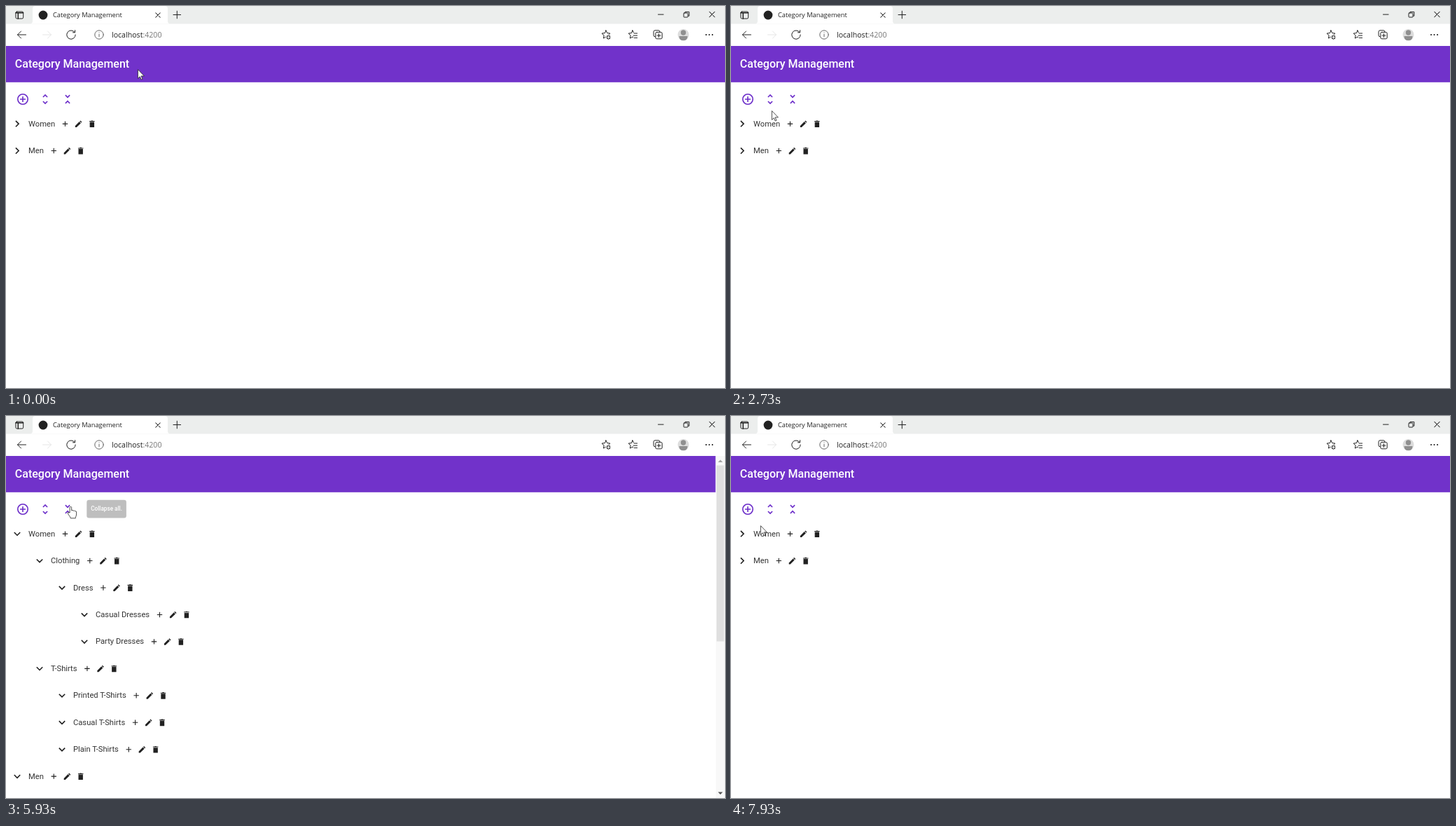
An HTML page that plays this animation: 1027 by 545 pixels, repeating every 8000 ms.

```html
<!DOCTYPE html>
<html lang="en">
<head>
<meta charset="utf-8">
<title>Category Management</title>
<style>
  html, body { margin: 0; width: 100%; height: 100%; overflow: hidden; background: #fff; }
  svg { display: block; width: 100vw; height: 100vh; }
  text { font-family: Roboto, sans-serif; white-space: pre; }
  .ui { font-family: "Open Sans", "Noto Sans", sans-serif; fill: #222; }
  .thin { fill: none; stroke: #222; stroke-linecap: round; stroke-linejoin: round; }
  .bold { fill: none; stroke-width: 1.6; }
</style>
</head>
<body>
<svg id="stage" viewBox="0 0 1027 545">
  <!-- browser window -->
  <rect width="1027" height="25.5" fill="#eceeed"/>
  <path d="M34 25.5q4 0 4-4V4q0-4 4-4h185q4 0 4 4v17.500q0 4 4 4z" fill="#fff"/>
  <circle cx="53" cy="13" r="6.400" fill="#222"/>
  <text class="ui" x="67" y="16.200" font-size="9.300">Category Management</text>
  <text class="ui" x="151" y="44.800" font-size="10.600">localhost<tspan fill="#777">:4200</tspan></text>
  <g id="chrome" class="thin">
    <rect x="13.900" y="8" width="10.800" height="10" rx="1.800"/>
    <path d="M14 9.700h10.600M17.300 10v8" stroke-width="1.500"/>
    <path d="M931.500 12.100h7.600M970 9.600v-1.200h5.800v5.800h-1.200"/>
    <rect x="968" y="10" width="6" height="6" rx=".8"/>
    <path d="M28.500 41h-12m5-5l-5 5 5 5"/>
    <path d="M52.500 41h12m-5-5l5 5-5 5" stroke="#e6e6e6"/>
    <path d="M98 37.400A6.200 6.200 0 1 0 99.200 41M98.600 34.600v3.200h-3.200"/>
    <g stroke="#666"><circle cx="133" cy="41" r="6.200"/><path d="M133 40.200v3.600m0-6v.1"/></g>
    <path d="M927 43.800q-2 0-2-2v-5q0-2 2-2h5q2 0 2 2"/>
    <rect x="927.800" y="37.400" width="9.400" height="9.400" rx="1.800"/>
    <path d="M1000 41h.1m4.400 0h.1m4.400 0h.1" stroke-width="2"/>
  </g>
  <g>
    <circle cx="967.500" cy="41" r="8" fill="#dcdcdc"/>
    <circle cx="967.500" cy="38" r="3.700" fill="#8f8f8f"/>
    <path d="M961.500 43h12q0 6.300-6 6.300t-6-6.300z" fill="#8f8f8f"/>
  </g>

  <!-- page -->
  <rect id="header" y="57" height="51.800" fill="#7132ca"/>
  <text x="12.800" y="88.300" font-size="16" font-weight="500" fill="#fff">Category Management</text>
  <g id="tools" class="bold" stroke="#6b2cc9"></g>
  <g id="closed"></g>
  <g id="open"></g>
  <g id="scrollbar">
    <rect x="1014" y="57" width="13" height="488" fill="#f8f8f8"/>
    <rect x="1015" y="70.500" width="10.600" height="251" fill="#dfdfdf"/>
    <path d="M1017 66l3.400-3.600 3.400 3.600z" fill="#a3a3a3"/>
    <path d="M1017 536.500l3.400 3.600 3.400-3.600z" fill="#505050"/>
  </g>
  <g id="tips"></g>
  <g id="cursor" fill="#fff" stroke="#222" stroke-width=".8" stroke-linejoin="round">
    <path id="arrow" d="M.4.6V13.400L3.300 10.700 5.200 15 7 14.200 5.100 9.900H9.400Z"/>
    <path id="hand" d="M-1.400 9V1.700a1.300 1.300 0 0 1 2.600 0V5.800q1.500-1 2.500.4 1.500-.8 2.400.6 2-.4 2 1V11q0 2-1.200 4.500v1.300H-.3q0-2-2.600-4.500L-4.200 9.800q-.4-2 1.900-1z"/>
  </g>
</svg>
<script>
const LOOP = 8000, TICK = 200 / 3;
const $ = id => document.getElementById(id);
const clamp = v => Math.min(1, Math.max(0, v));

function el(parent, name, attrs, content = '') {
  const node = document.createElementNS('http://www.w3.org/2000/svg', name);
  for (const key in attrs) node.setAttribute(key, attrs[key]);
  node.textContent = content;
  return parent.appendChild(node);
}

const path = (parent, d, attrs) => el(parent, 'path', { d, ...attrs });
const plus = (parent, x, y, r, attrs) =>
  path(parent, `M${x - r} ${y}h${2 * r}M${x} ${y - r}v${2 * r}`, attrs);
const chevron = (parent, x, y, r, turn = 0) =>
  path(parent, `M${-r} ${-r / 2}L0 ${r / 2} ${r} ${-r / 2}`, { transform: `translate(${x} ${y}) rotate(${turn})` });

function star(x, y) {
  const points = Array.from({ length: 10 }, (_, i) => {
    const r = i % 2 ? 3 : 6.2, a = i * Math.PI / 5;
    return [x + r * Math.sin(a), y - r * Math.cos(a)];
  });
  el($('chrome'), 'polygon', { points: points.join(' ') });
}

function drawChrome() {
  const g = $('chrome');
  plus(g, 244.3, 12.5, 5.3);
  plus(g, 932.5, 42.1, 2.5);
  for (const [x, y, r] of [[217, 13, 4.6], [1008.5, 12, 5.3]])
    plus(g, x, y, r, { transform: `rotate(45 ${x} ${y})` });
  star(857, 41);
  el(g, 'circle', { cx: 860.6, cy: 44.6, r: 3.6, fill: '#555', stroke: '#fff' });
  plus(g, 860.6, 44.6, 1.6, { stroke: '#fff' });
  star(895, 41);
  el(g, 'rect', { x: 896, y: 38, width: 7, height: 10, fill: '#fff', stroke: 'none' });
  path(g, 'M897 39h4.600m-5.500 3.200h5.500m-4.500 3.200h4.500');
}

function drawTools() {
  const g = $('tools'), y = 133;
  el(g, 'circle', { cx: 24, cy: y, r: 7.2 });
  plus(g, 24, y, 4);
  for (const side of [-1, 1]) {
    chevron(g, 56, y + 4.5 * side, 3.1, side < 0 ? 180 : 0);
    chevron(g, 88, y + 4.3 * side, 3.1, side < 0 ? 0 : 180);
  }
}

// 24-unit outlines
const PENCIL = 'M3 21v-3.750L14 6l4 4L6.800 21zM15 5l2-2 4 4-2 2z';
const TRASH = 'M6 7h12v14H6zM5 4h4l1-1h4l1 1h4v2H5z';

function drawTree(parent, rows, turn) {
  rows.forEach(([level, label], i) => {
    const x = 32 * level, y = 168.1 + 38.45 * i;
    const lines = el(parent, 'g', { class: 'bold', stroke: '#212121' });
    chevron(lines, x + 16, y, 4.2, turn);
    const text = el(parent, 'text', { x: x + 32, y: y + 3.5, 'font-size': 11.2, fill: '#333' }, label);
    const start = x + 46.4 + text.getComputedTextLength();
    plus(lines, start, y, 3.7, { 'stroke-width': 1.1 });
    [PENCIL, TRASH].forEach((d, n) => path(parent, d, {
      fill: '#212121',
      transform: `translate(${start + 19.2 * (n + 1)} ${y + .1}) scale(.533) translate(-12 -12)`
    }));
  });
}

function tooltip(x, width, label) {
  const tip = el($('tips'), 'g', {});
  el(tip, 'rect', { x, y: 119.7, width, height: 25.8, rx: 3.2, fill: '#7f7f7f' });
  el(tip, 'text', {
    x: x + width / 2, y: 135.4, 'text-anchor': 'middle', 'font-size': 8.2, 'font-weight': 500, fill: '#fff'
  }, label);
  return tip;
}

drawChrome();
drawTools();
drawTree($('closed'), [[0, 'Women'], [0, 'Men']], -90);
drawTree($('open'), [
  [0, 'Women'], [1, 'Clothing'], [2, 'Dress'], [3, 'Casual Dresses'], [3, 'Party Dresses'],
  [1, 'T-Shirts'], [2, 'Printed T-Shirts'], [2, 'Casual T-Shirts'], [2, 'Plain T-Shirts'], [0, 'Men']
], 0);
const expandTip = tooltip(83.2, 51.8, 'Expand all.');
const collapseTip = tooltip(115.3, 56.6, 'Collapse all.');

// pointer moves: start and end tick, destination, sideways bow
const MOVES = [
  { from: 0, to: 1, x: 193, y: 189 },
  { from: 10, to: 16, x: 0, y: 336 },
  { from: 20, to: 21, x: 490, y: 264 },
  { from: 24, to: 31, x: 301, y: 148, bow: 90 },
  { from: 35, to: 41, x: 58, y: 149 },
  { from: 41, to: 48, x: 60, y: 128, bow: -17 },
  { from: 48, to: 55, x: 62.5, y: 133 },
  { from: 86, to: 89, x: 92.5, y: 129 },
  { from: 89, to: 93, x: 98.5, y: 131 },
  { from: 112, to: 119, x: 42, y: 156, bow: 44 }
];

function pointer(tick) {
  let x = 188, y = 90;
  for (const move of MOVES) {
    const k = clamp((tick - move.from) / (move.to - move.from));
    x += (move.x - x) * k + (move.bow || 0) * Math.sin(Math.PI * k);
    y += (move.y - y) * k;
  }
  return [x, y];
}

const fade = (tick, start, end) => clamp((tick - start) / 4) * clamp(1 - .94 * (tick - end));
const show = (node, on) => node.setAttribute('display', on ? 'inline' : 'none');

function draw(ms) {
  const tick = Math.floor((ms + 7) / TICK);
  const expanded = tick >= 57 && tick < 100;
  const pointing = tick >= 45 && tick < 114;
  show($('open'), expanded);
  show($('scrollbar'), expanded);
  show($('closed'), !expanded);
  show($('hand'), pointing);
  show($('arrow'), !pointing);
  $('header').setAttribute('width', expanded ? 1013.5 : 1027);
  expandTip.setAttribute('opacity', fade(tick, 44, 56));
  collapseTip.setAttribute('opacity', fade(tick, 87, 98.9));
  $('cursor').setAttribute('transform', `translate(${pointer(tick)})`);
}

const begin = performance.now();
function frame() {
  draw((performance.now() - begin) % LOOP);
  requestAnimationFrame(frame);
}
frame();
</script>
</body>
</html>
```
